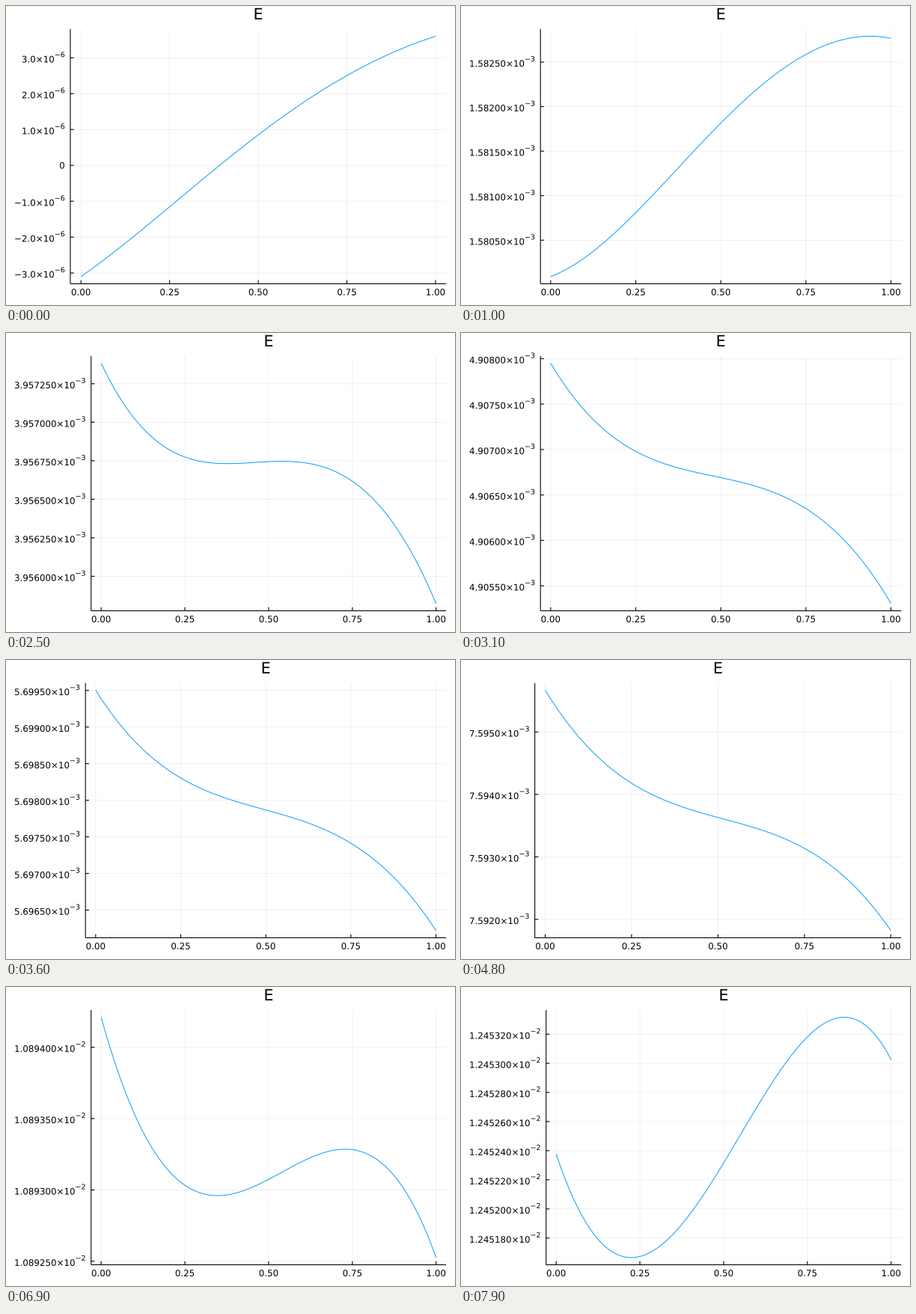
Write a matplotlib script that moves like this. It is 600x400 px and loops after 8000 ms.

```python
import math

import numpy as np
import matplotlib.pyplot as plt
from matplotlib.animation import FuncAnimation
from matplotlib.patches import PathPatch
from matplotlib.path import Path
from matplotlib.textpath import TextPath
from numpy.polynomial.polynomial import polyval

W, H, DPI = 600, 400, 100
FRAMES, INTERVAL = 80, 100
RIGHT, TOP, BOTTOM = 588.2, 30.8, 371.6
EM, SUP_EM, TITLE_EM = 11.85, 9.48, 20.74
BLUE = "#009AFA"
XS = np.linspace(0, 1, 101)


def field(t):
    """Field along x in units of 1e-6, with t running from 0 to 1."""
    mean = polyval(t, [0.85, 12634.1566, 128.1527, -157.0999, -0.8385, 2.4987])
    slope = polyval(t, [3.35, -17.986, 14.982, 1.2626, -1.1469])
    bow = polyval(t, [-0.6, 1.9064, -1.6224, 0.7117])
    wave = polyval(t, [-0.413, -1.408, 0.2304])
    ripple = 0.14 - 0.224 * t
    u = 2 * XS - 1
    return (mean + slope * u + bow * u**2
            + wave * (u**3 - u) + ripple * (u**4 - u**2))


def pick_ticks(lo, hi):
    """Choose round ticks by granularity, zero, coverage and niceness."""
    best, best_score = None, -math.inf
    niceness = {1: 1.0, 5: 0.9, 2: 0.7, 2.5: 0.5, 3: 0.2}
    top = math.ceil(math.log10(hi - lo))
    for z in range(top, top - 4, -1):
        for q, nice in niceness.items():
            gap = q * 10.0 ** z
            idx = np.arange(math.ceil(lo / gap - 1e-9),
                            math.floor(hi / gap + 1e-9) + 1)
            n = len(idx)
            if not 4 <= n <= 8:
                continue
            score = ((1 - abs(n - 6) / 6) / 4 + (0 in idx) / 6
                     + 1.5 * (hi - lo) / ((n - 1) * gap) / 3 + nice / 4)
            if score > best_score:
                best, best_score = idx * gap, score
    return best


def format_ticks(ticks):
    """Pairs of (mantissa text, exponent text)."""
    exps = [math.floor(math.log10(abs(v)) + 1e-9) if v else 0 for v in ticks]
    mants = [v / 10.0 ** e for v, e in zip(ticks, exps)]
    digits = 0
    while digits < 9 and any(abs(round(m, digits) - m) > 1e-8 for m in mants):
        digits += 1
    out = []
    for m, e in zip(mants, exps):
        if m == 0:
            out.append(("0", ""))
        else:
            text = f"{m:.{digits + 1}f}×10".replace("-", "−")
            out.append((text, str(e - 6).replace("-", "−")))
    return out


def advance(text, em):
    wide = {".": 0.3178, "×": 0.8379, "−": 0.8379, "E": 0.6318}
    return em * sum(wide.get(c, 0.6362) for c in text)


fig = plt.figure(figsize=(W / DPI, H / DPI), dpi=DPI, facecolor="white")
ax = fig.add_axes([0, 0, 1, 1])


def text(x, y, s, em):
    """Draw s with its pen start at x and its baseline at y."""
    glyphs = TextPath((0, 0), s, size=em)
    path = Path(glyphs.vertices * [1, -1] + [x, y], glyphs.codes)
    ax.add_patch(PathPatch(path, fc="black", lw=0, snap=False))


def centered(x, y, s, em):
    text(x - advance(s, em) / 2, y, s, em)


def line(xs, ys, px=1.1, color="black", alpha=1.0):
    ax.plot(xs, ys, color=color, lw=px * 72 / DPI, alpha=alpha, snap=False,
            solid_capstyle="butt", solid_joinstyle="round")


def draw(step):
    ax.cla()
    ax.set(xlim=(0, W), ylim=(H, 0))
    ax.axis("off")

    ys = field(step / FRAMES)
    pad = 0.03 * np.ptp(ys)
    lo, hi = ys.min() - pad, ys.max() + pad
    ticks = pick_ticks(lo, hi)
    labels = format_ticks(ticks)
    widths = [advance(m, EM) + advance(e, SUP_EM) for m, e in labels]
    left = 18.2 + max(widths)

    def px(x):
        return left + (x + 0.03) / 1.06 * (RIGHT - left)

    def py(y):
        return BOTTOM - (y - lo) / (hi - lo) * (BOTTOM - TOP)

    x_ticks = np.linspace(0, 1, 5)
    for x in x_ticks:
        line([px(x)] * 2, [TOP, BOTTOM], 0.55, alpha=0.1)
    for y in ticks:
        line([left, RIGHT], [py(y)] * 2, 0.55, alpha=0.1)

    line([left, RIGHT], [BOTTOM] * 2)
    line([left] * 2, [TOP, BOTTOM])
    for x in x_ticks:
        line([px(x)] * 2, [BOTTOM, BOTTOM - 4.7])
        centered(px(x), 387, f"{x:.2f}", EM)
    for y, (mant, exp), width in zip(ticks, labels, widths):
        line([left, left + 4.7], [py(y)] * 2)
        start = left - 7.2 - width
        if exp:
            text(start, py(y) + 6.2, mant, EM)
            text(start + advance(mant, EM), py(y) - 0.9, exp, SUP_EM)
        else:
            text(start, py(y) + 4.3, mant, EM)

    line(px(XS), py(ys), 0.95, BLUE)
    centered((left + RIGHT) / 2, 17.9, "E", TITLE_EM)
    return []


anim = FuncAnimation(fig, draw, frames=FRAMES, interval=INTERVAL,
                     init_func=lambda: draw(0), repeat=True, repeat_delay=0)
plt.show()
```
